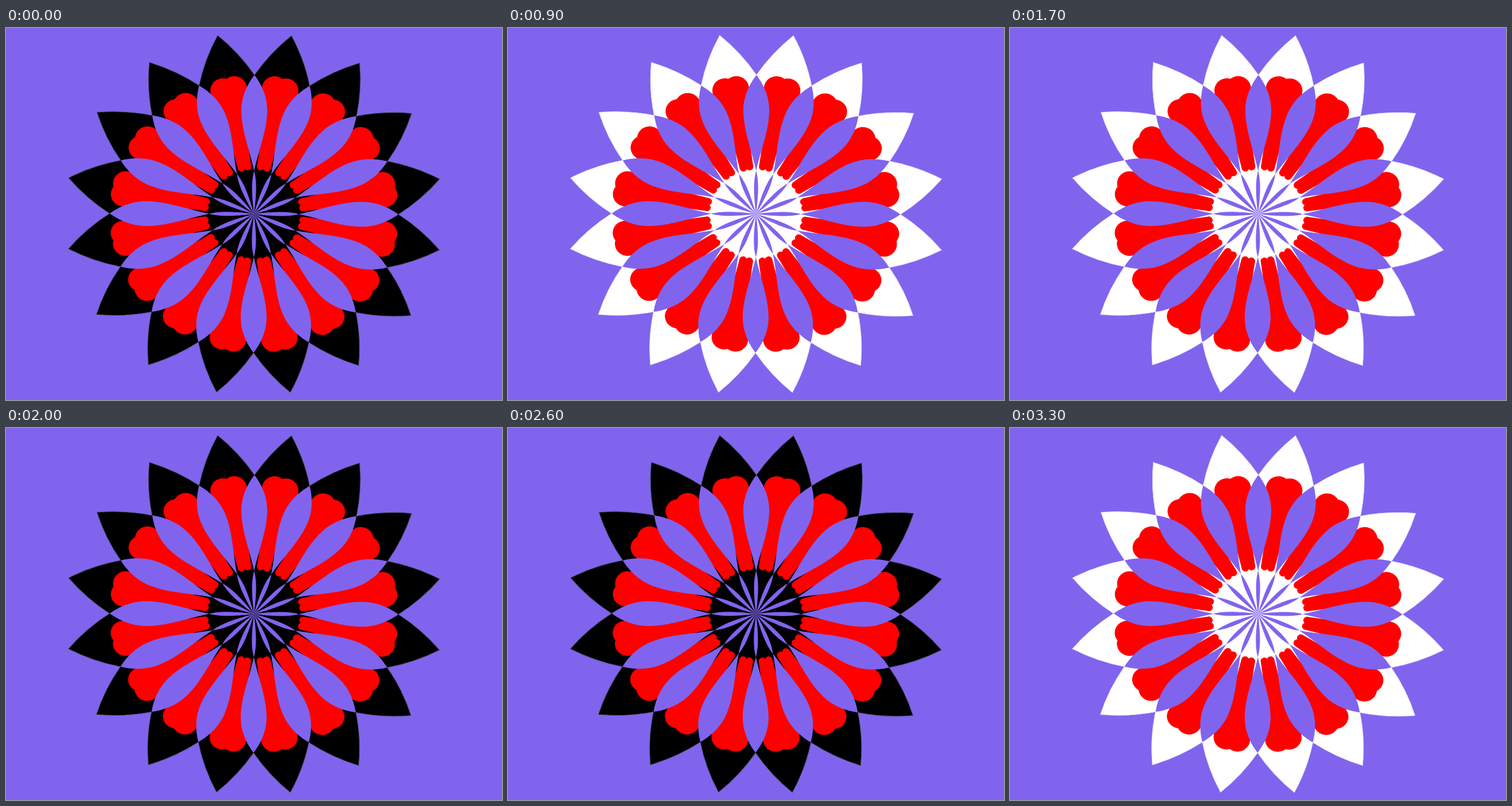
These frames come from a looping animation (864 by 648 pixels, 3400 ms). An HTML page without scripts:

```html
<!DOCTYPE html>
<html lang="en">
<head>
<meta charset="utf-8">
<title>Flashing flower</title>
<style>
  html, body { margin: 0; width: 100%; height: 100%; overflow: hidden; background: #8064ee; }
  svg { display: block; width: 100vw; height: 100vh; }
  .petals { fill: #000; stroke: #4a4658; animation: flash 200ms step-end infinite; }
  .red { fill: #f00; }
  .gaps { fill: #8064ee; }
  @keyframes flash {
    0% { fill: #000; stroke: #4a4658; }
    50%, 100% { fill: #fff; stroke: #e4defc; }
  }
</style>
</head>
<body>
<svg viewBox="0 0 864 648">
  <defs>
    <!-- one sector each, pointing along +x -->
    <g id="petal">
      <path stroke="none" d="M0 0L246.7 49.1Q291.7 30.6 329.5 0Q291.7 -30.6 246.7 -49.1Z"/>
      <path fill="none" d="M246.7 49.1Q291.7 30.6 329.5 0Q291.7 -30.6 246.7 -49.1"/>
    </g>
    <g id="bone">
      <path d="M86 -12L115 -13.5L160 -30L230 -32V32L160 30L115 13.5L86 12Z"/>
      <circle cx="230" cy="-10" r="22"/>
      <circle cx="230" cy="10" r="22"/>
      <circle cx="86" cy="-5.5" r="6.5"/>
      <circle cx="86" cy="5.5" r="6.5"/>
    </g>
    <path id="gap" d="M251.5 0C236 -11.5 214 -22.5 188 -22.5C152 -22.5 120 -9 78 0C62 -4.5 40 -5 0 0C40 5 62 4.5 78 0C120 9 152 22.5 188 22.5C214 22.5 236 11.5 251.5 0Z"/>

    <!-- doubling: 2, 4, 8, 16 copies -->
    <g id="petal2"><use href="#petal"/><use href="#petal" transform="rotate(22.5)"/></g>
    <g id="petal4"><use href="#petal2"/><use href="#petal2" transform="rotate(45)"/></g>
    <g id="petal8"><use href="#petal4"/><use href="#petal4" transform="rotate(90)"/></g>
    <g id="bone2"><use href="#bone"/><use href="#bone" transform="rotate(22.5)"/></g>
    <g id="bone4"><use href="#bone2"/><use href="#bone2" transform="rotate(45)"/></g>
    <g id="bone8"><use href="#bone4"/><use href="#bone4" transform="rotate(90)"/></g>
    <g id="gap2"><use href="#gap"/><use href="#gap" transform="rotate(22.5)"/></g>
    <g id="gap4"><use href="#gap2"/><use href="#gap2" transform="rotate(45)"/></g>
    <g id="gap8"><use href="#gap4"/><use href="#gap4" transform="rotate(90)"/></g>
  </defs>

  <g transform="translate(432 323.9) rotate(.18) scale(1 .9615)">
    <g class="petals" transform="rotate(11.25)">
      <use href="#petal8"/><use href="#petal8" transform="rotate(180)"/>
    </g>
    <g class="red" transform="rotate(11.25)">
      <use href="#bone8"/><use href="#bone8" transform="rotate(180)"/>
    </g>
    <g class="gaps">
      <use href="#gap8"/><use href="#gap8" transform="rotate(180)"/>
    </g>
  </g>
</svg>
</body>
</html>
```
